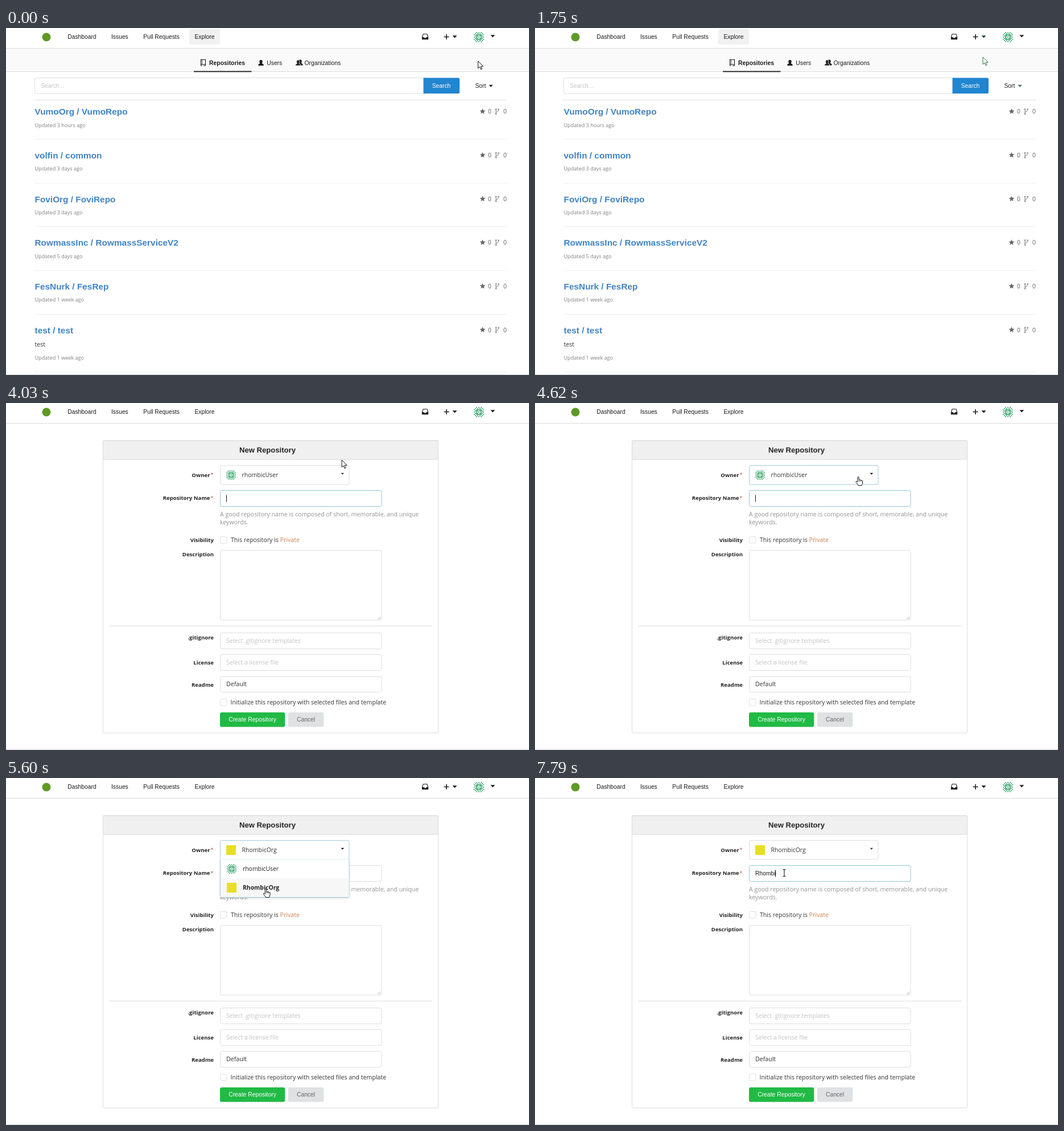
Recreate the animation shown at these times as an HTML page. Size 919x609 px, loop 8 s.

```html
<!DOCTYPE html>
<html lang="en">
<head>
<meta charset="utf-8">
<title>New repository</title>
<style>
  html, body { margin: 0; width: 100%; height: 100%; overflow: hidden; background: #fff; }
  svg { display: block; width: 919px; height: 609px; }
  text { white-space: pre; }
  .a { font-family: "Liberation Sans", Arial, sans-serif; }
  .o { font-family: "Open Sans", "Noto Sans", sans-serif; }
</style>
</head>
<body>
<svg id="stage" viewBox="0 0 919 609" xmlns="http://www.w3.org/2000/svg"></svg>
<script>
const LOOP = 8000;
const TYPED = 'Rhombic';
const USER = 'rhombicUser', ORG = 'RhombicOrg';

// Drawing helpers, each returns SVG markup
const text = (x, y, s, { font = 'a', size = 10.3, fill = '#1b1c1d', bold = false, anchor = 'start', id = '' } = {}) =>
  `<text ${id && `id="${id}"`} class="${font}" x="${x}" y="${y}" font-size="${size}" fill="${fill}" font-weight="${bold ? 700 : 400}" text-anchor="${anchor}">${s}</text>`;
const body = (x, y, s, more = {}) => text(x, y, s, { font: 'o', size: 10.6, fill: '#333', ...more });
const box = (x, y, w, h, { fill = '#fff', stroke = '#dededf', r = 3, id = '' } = {}) =>
  `<rect ${id && `id="${id}"`} x="${x}" y="${y}" width="${w}" height="${h}" rx="${r}" fill="${fill}" stroke="${stroke}"/>`;
const rule = (x, y, w, color) => `<rect x="${x}" y="${y}" width="${w}" height="1" fill="${color}"/>`;
const caret = (x, y, w, h, id = '') =>
  `<path ${id && `id="${id}"`} d="M${x - w / 2} ${y}h${w}l${-w / 2} ${h}z" fill="#1b1c1d"/>`;
const group = (id, inner) => `<g id="${id}">${inner}</g>`;
const path = (d, attrs) => `<path d="${d}" ${attrs}/>`;

// Symmetric badge: checkered disc with a closed inner ring
function badge(x, y, size) {
  let d = '';
  for (let i = -4; i <= 4; i++) for (let j = -4; j <= 4; j++) {
    const q = i * i + j * j;
    if (q < 26 && ((i + j) % 2 === 0 || q === 5)) d += `M${i + 4} ${j + 4}h1v1h-1z`;
  }
  return `<g transform="translate(${x} ${y}) scale(${size / 9})">${path(d, 'fill="#62b68b"')}</g>`;
}
const orgBadge = (x, y) => `<rect x="${x}" y="${y}" width="17" height="17" fill="#e8df25"/>`;

function star(cx, cy, r) {
  const pts = [...Array(10)].map((_, i) => {
    const q = i % 2 ? r * 0.45 : r, a = i * Math.PI / 5;
    return `${(cx + q * Math.sin(a)).toFixed(2)},${(cy - q * Math.cos(a)).toFixed(2)}`;
  });
  return `<polygon points="${pts.join(' ')}" fill="#666"/>`;
}
const fork = (x, y) => `<g transform="translate(${x} ${y})" fill="none" stroke="#777">
  <path d="M1.5 2.5V9M6 2.8Q6 5.5 1.5 7"/><circle cx="1.5" cy="1.6" r="1"/><circle cx="6" cy="1.8" r="1"/><circle cx="1.5" cy="9.7" r="1"/></g>`;
const person = (x, y, attrs = '') =>
  path(`M${x - 4.8} ${y + 5}q0-3 3.2-3.7q-1.1-1.2-1.1-3.2q0-3.100 2.700-3.100t2.700 3.100q0 2-1.100 3.200q3.200 .7 3.200 3.700z`.replace(/00\b/g, ''), `fill="#1b1c1d" ${attrs}`);

function navbar() {
  return rule(0, 35, 919, '#e2e2e2') + rule(0, 36, 919, '#f4f4f4') +
    '<circle cx="71" cy="16" r="7.5" fill="#609926"/>' +
    text(108.3, 18.8, 'Dashboard') + text(185, 18.8, 'Issues') +
    text(241.3, 18.8, 'Pull Requests') + text(331.5, 18.8, 'Explore') +
    path('M733 10.8h7l1.6 5.2v3.8h-10.2v-3.8z', 'fill="none" stroke="#1b1c1d" stroke-width="1.1" stroke-linejoin="round"') +
    path('M731.4 16h3l1 1.6h2.4l1-1.6h2.8v4h-10.2z', 'fill="#1b1c1d"') +
    path('M774 11v9M769.5 15.5h9', 'stroke="#1b1c1d" stroke-width="1.6"') +
    caret(788.5, 13.3, 8, 4.3, 'plusCaret') + badge(822, 7, 18) + caret(855.3, 12.3, 8, 4.3);
}

function listPage() {
  const rows = [
    ['VumoOrg / VumoRepo', '3 hours'], ['volfin / common', '3 days'], ['FoviOrg / FoviRepo', '3 days'],
    ['RowmassInc / RowmassServiceV2', '5 days'], ['FesNurk / FesRep', '1 week'], ['test / test', '1 week', 'test']
  ];
  let s = '<rect x="322" y="2" width="54" height="27" rx="3" fill="#f1f1f1"/>' + text(331.5, 18.8, 'Explore') +
    '<rect y="37" width="919" height="39" fill="#fafafa"/>' + rule(0, 76, 919, '#dcdcdc') +
    '<rect x="330" y="75.5" width="101.5" height="1.8" fill="#1b1c1d"/>' +
    path('M342.5 55.5h8v8.5h-8zM342.5 64v2h2M347 66h3.5v-2', 'fill="none" stroke="#1b1c1d" stroke-width="1.1"') +
    path('M344.5 56v8', 'stroke="#1b1c1d" stroke-width=".8"') +
    text(357, 64.5, 'Repositories', { bold: true, size: 10.4 }) +
    person(448, 61) + text(458.3, 64.5, 'Users') +
    person(517, 60.5) + person(513.2, 61, 'stroke="#fafafa" stroke-width=".8"') + text(524.5, 64.5, 'Organizations') +
    box(50.5, 87.5, 690, 27.5) + text(61.2, 104.7, 'Search...', { fill: '#c4c4c4' }) +
    path('M733.5 87.5h61q2.5 0 2.5 2.5v22.5q0 2.5-2.5 2.5h-61z', 'fill="#2185d0"') +
    text(765, 104.6, 'Search', { fill: '#fff', anchor: 'middle' }) +
    text(824.5, 105, 'Sort') + caret(852, 99.8, 7, 4, 'sortCaret') + rule(50, 126, 830, '#dedede');
  rows.forEach(([name, age, note], i) => {
    const y = i * 76.65, drop = note ? 24.7 : 0;
    s += text(50.5, 152.4 + y, name, { size: 15.4, bold: true, fill: '#4183c4' }) +
      star(837.5, 146.5 + y, 5.2) + text(846.9, 150.3 + y, '0', { fill: '#666' }) +
      fork(859.5, 141 + y) + text(874, 150.3 + y, '0', { fill: '#666' }) +
      (note ? body(50.5, 558.7, note) : '') +
      body(50.5, 173.7 + y + drop, `Updated ${age} ago`, { size: 9.1, fill: '#808080' }) +
      rule(50, Math.round(195 + y + drop), 830, '#efefef');
  });
  return s;
}

function plusMenu() {
  const items = ['Repository', 'Migration', 'Organization'];
  return box(757.5, 31.5, 120, 86, { stroke: '#d8d8d9' }) + items.map((name, i) => {
    const y = 46 + i * 28.5;
    return path(`M776 ${y - 4}v8M772 ${y}h8`, 'stroke="#1b1c1d" stroke-width="1.5"') + text(786, y + 3.7, 'New ' + name);
  }).join('');
}

function label(y, s, needed) {
  return body(needed ? 358.5 : 365, y, s, { size: 9.6, bold: true, anchor: 'end', fill: '#222' }) +
    (needed ? body(359.6, y - 0.6, '*', { size: 9, fill: '#c2553f' }) : '');
}

function formPage() {
  const hint = { fill: '#c2c2c2' }, help = { fill: '#949494' };
  const owner = { size: 10.5 };
  return box(170.5, 66, 589, 513, { stroke: '#dcdcdd', r: 2 }) +
    box(170.5, 66, 589, 33, { fill: '#f0f0f0', stroke: '#d9d9da', r: 2 }) +
    text(459.5, 86.8, 'New Repository', { size: 13.1, bold: true, anchor: 'middle', fill: '#222' }) +
    label(129.6, 'Owner', true) + box(376.5, 109.5, 226.5, 33.5, { id: 'ownerBox' }) +
    group('ownUser', badge(387, 118, 17) + body(414.5, 129.6, USER, { ...owner, id: 'ownName' })) +
    group('ownOrg', orgBadge(387, 118) + body(414.5, 129.6, ORG, owner)) +
    caret(591.3, 122.8, 5.4, 3, 'ownCaret') +
    label(170.3, 'Repository Name', true) + box(376.5, 153.5, 283.5, 28, { id: 'nameBox' }) +
    text(387, 170.5, '', { id: 'typed' }) + '<rect id="bar" y="161.5" width="1" height="12" fill="#111"/>' +
    body(376, 199, 'A good repository name is composed of short, memorable, and unique', help) +
    body(376, 213, 'keywords.', help) +
    label(243.6, 'Visibility') + box(376.5, 234.5, 11.5, 11.5, { r: 2 }) +
    body(395, 243.7, 'This repository is <tspan fill="#d08150">Private</tspan>') +
    label(269, 'Description') + box(376.5, 258.5, 283.5, 122.5) +
    path('M653.5 379.5l4.5-4.5M656 379.5l2-2', 'stroke="#999" stroke-width=".8"') +
    rule(181, 391, 568, '#dedede') +
    label(415.2, '.gitignore') + box(376.5, 403.5, 283.5, 28) + body(387, 421, 'Select .gitignore templates', hint) +
    label(459.2, 'License') + box(376.5, 441.5, 283.5, 28) + body(387, 459, 'Select a license file', hint) +
    label(497.5, 'Readme') + box(376.5, 480, 283.5, 27.5) + body(387, 497.2, 'Default') +
    box(376.5, 519.5, 11.5, 11.5, { r: 2 }) +
    body(394.6, 529.2, 'Initialize this repository with selected files and template') +
    box(376, 543, 114.3, 25.5, { fill: '#21ba45', stroke: 'none' }) +
    text(433, 558.9, 'Create Repository', { fill: '#fff', anchor: 'middle', size: 10.4 }) +
    box(495.8, 543, 62.5, 25.5, { fill: '#e0e1e2', stroke: 'none' }) +
    text(527, 558.9, 'Cancel', { fill: '#666', anchor: 'middle' }) +
    group('drop', ownerList());
}

function ownerList() {
  return path('M376.5 0V64q0 2.5 2.5 2.5H600.5q2.5 0 2.5-2.5V0z', 'fill="#fff" stroke="#9fcbdc" filter="url(#soft)"') +
    path('M377 0H602.5', 'stroke="#fff" stroke-width="1.6"') +
    '<rect id="picked" x="377" width="225.5" height="33" fill="#f7f7f7"/>' +
    badge(388, 8, 17) + body(416, 20, USER, { id: 'itemUser', size: 10.4, fill: '#222' }) +
    orgBadge(388, 41) + body(416, 52.6, ORG, { id: 'itemOrg', size: 10.4, fill: '#222' });
}

const pointers =
  group('arrow', path('M0 0V12.7L3 10L5 14.8L7 14L5 9.3H9z', 'fill="#fff" stroke-linejoin="round"')) +
  group('hand', path('M-1.2 9.5V1Q0-.8 1.2 1V5.5Q2.5 4.7 3.4 5.9Q4.8 5.2 5.6 6.5Q7 6.1 7.5 7.5V11Q7 13 6 15.5H0Q-1 13-4 10Q-4.5 8-2.8 8.2z',
    'fill="#fff" stroke="#111" stroke-linejoin="round"') + path('M1.2 5.5v3M3.4 6v2.5M5.6 6.5v2', 'stroke="#111" stroke-width=".8"')) +
  group('beam', path('M-2.5-6H-.7L0-5.5L.7-6H2.5M0-5.5V5.5M-2.5 6H-.7L0 5.5L.7 6H2.5', 'fill="none" stroke="#111" stroke-width="1.1"'));

const stage = document.getElementById('stage');
stage.innerHTML = '<defs><filter id="soft" x="-5%" y="-10%" width="110%" height="130%"><feDropShadow dx="0" dy="1.5" stdDeviation="1.3" flood-color="#223" flood-opacity=".16"/></filter></defs>' +
  '<rect width="919" height="609" fill="#fff"/>' + navbar() +
  group('list', listPage()) + group('menu', plusMenu()) + group('form', formPage()) +
  rule(0, 608, 919, '#cfcfcf') + pointers;

const el = {};
stage.querySelectorAll('[id]').forEach(n => el[n.id] = n);

// Stepped timelines: [start ms, value]
const steps = {
  pointer: [[0, ['arrow', 829.5, 58]], [70, ['hand', 776, 11]], [750, ['hand', 776, 17]], [1380, ['hand', 788, 46]],
    [1750, ['arrow', 787, 51]], [4030, ['arrow', 590, 100]], [4380, ['hand', 568, 129.3]], [5270, ['hand', 505, 166]],
    [5380, ['hand', 456.5, 194]], [6020, ['beam', 455, 197]], [6650, ['beam', 438, 166.5]]],
  drop: [[0, 0], [4830, 0.5], [5060, 1], [6020, 0.2], [6300, 0]],
  letters: [[0, 0], [6870, 1], [7080, 3], [7360, 4], [7580, 5], [7790, 6]],
  bar: [[0, 1], [3070, 0], [4030, 1], [4830, 0], [6650, 1]]
};
const at = (name, t) => steps[name].reduce((v, s) => t >= s[0] ? s[1] : v, null);
const within = (t, a, b) => t >= a && t < b;
const show = (node, on) => node.style.display = on ? '' : 'none';
const paint = (node, key, v) => node.setAttribute(key, v);

function render(t) {
  const onForm = t >= 2520, org = t >= 5600;
  show(el.list, !onForm);
  show(el.form, onForm);
  show(el.menu, within(t, 750, 1750));

  const green = within(t, 1750, 2520);
  paint(el.sortCaret, 'fill', green ? '#2d7548' : '#1b1c1d');
  paint(el.plusCaret, 'fill', green ? '#1d4a30' : '#1b1c1d');

  const [kind, x, y] = at('pointer', t);
  for (const k of ['arrow', 'hand', 'beam']) show(el[k], k === kind);
  paint(el[kind], 'transform', `translate(${x} ${y})`);
  paint(el.arrow, 'stroke', within(t, 1750, 4030) ? '#2a7a3c' : '#111');

  paint(el.ownerBox, 'stroke', within(t, 4620, 6300) ? '#9fcbdc' : '#dededf');
  paint(el.nameBox, 'stroke', within(t, 4830, 6650) ? '#dededf' : '#94c3de');
  paint(el.ownCaret, 'fill', within(t, 4620, 6440) ? '#000' : '#3a3a3a');
  show(el.ownUser, !org);
  show(el.ownOrg, org);
  paint(el.ownName, 'fill', within(t, 4830, 5600) ? '#595959' : '#333');

  const open = at('drop', t);
  show(el.drop, open > 0);
  paint(el.drop, 'transform', `translate(0 143) scale(1 ${open || 1})`);
  paint(el.drop, 'opacity', open);
  paint(el.picked, 'y', org ? 33 : 0);
  paint(el.itemUser, 'font-weight', org ? 400 : 700);
  paint(el.itemOrg, 'font-weight', org ? 700 : 400);

  const typed = TYPED.slice(0, at('letters', t));
  if (el.typed.textContent !== typed) el.typed.textContent = typed;
  show(el.bar, at('bar', t));
  paint(el.bar, 'x', 387 + (typed && onForm ? Math.round(el.typed.getComputedTextLength() - 0.5) : 0));
}

const start = performance.now();
function tick() {
  render((performance.now() - start) % LOOP);
  requestAnimationFrame(tick);
}
tick();
</script>
</body>
</html>
```
